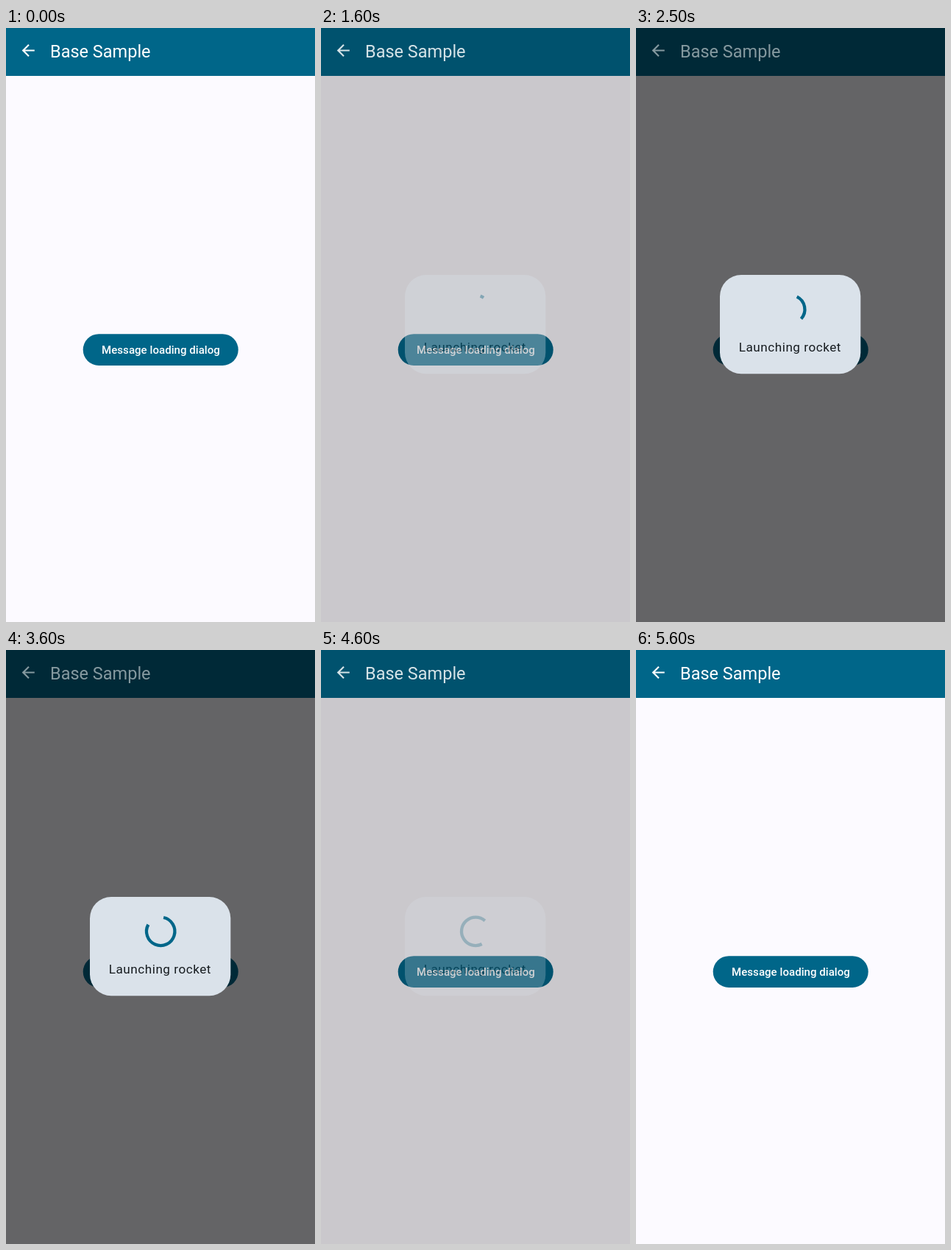
Write an HTML page that moves like this. It is 420 by 806 pixels and loops after 5700 ms.

```html
<!DOCTYPE html>
<html lang="en">
<head>
<meta charset="utf-8">
<title>Loading dialog</title>
<style>
  html, body { margin: 0; width: 100%; height: 100%; overflow: hidden; background: #fcfaff; }
  svg { display: block; width: 420px; height: 806px; }
  text { font-family: Roboto, sans-serif; }
</style>
</head>
<body>
<svg viewBox="0 0 420 806">
  <rect width="420" height="806" fill="#fcfaff"/>
  <rect width="420" height="65" fill="#006689"/>
  <rect x="104.7" y="415.2" width="211" height="42.8" rx="21.4" fill="#006689"/>
  <text x="130" y="442.4" font-size="15" font-weight="500" letter-spacing=".05" fill="#fff">Message loading dialog</text>
  <rect id="scrim" width="420" height="806" opacity="0"/>
  <g id="title" fill="#fff">
    <path transform="translate(17.4 17.7) scale(1.069)" d="M20 11H7.83l5.59-5.59L12 4l-8 8 8 8 1.41-1.41L7.83 13H20z"/>
    <text x="60" y="39.5" font-size="23.5">Base Sample</text>
  </g>
  <g id="dialog" opacity="0">
    <rect x="114" y="335" width="191.3" height="134.2" rx="29" fill="#dae2ea"/>
    <path id="arc" fill="none" stroke="#006689" stroke-width="4.3"/>
    <text x="139.8" y="439" font-size="17.1" letter-spacing=".53" fill="#171c20">Launching rocket</text>
  </g>
</svg>
<script>
const LOOP = 5700, STEP = 100, TURN = 1332;
const CENTER = { x: 210.2, y: 381.8 }, RADIUS = 19.2;
const [scrim, title, dialog, arc] =
  ['scrim', 'title', 'dialog', 'arc'].map(id => document.getElementById(id));

const scrimKeys = [[1500, 0], [1600, .2], [1700, .51], [1800, .6], [4400, .6], [4500, .55], [4600, .2], [4700, 0]];
const dialogKeys = [[1500, 0], [1600, .35], [1700, .99], [1800, 1], [4400, 1], [4500, .98], [4600, .25], [4700, 0]];
const spinKeys = [[1510, 0], [1700, 190], [2500, 940], [4500, 2945], [4700, 3145]];

const clamp = v => Math.min(1, Math.max(0, v));

function valueAt(keys, t) {
  const next = keys.findIndex(key => key[0] > t);
  if (next === 0) return keys[0][1];
  if (next < 0) return keys[keys.length - 1][1];
  const [t0, a] = keys[next - 1], [t1, b] = keys[next];
  return a + (b - a) * (t - t0) / (t1 - t0);
}

// cubic-bezier(.4, 0, .2, 1)
function ease(x) {
  x = clamp(x);
  let low = 0, high = 1;
  for (let i = 0; i < 24; i++) {
    const s = (low + high) / 2, r = 1 - s;
    if (1.2 * r * r * s + .6 * r * s * s + s ** 3 < x) low = s;
    else high = s;
  }
  return 3 * low * low - 2 * low ** 3;
}

function polar(degrees) {
  const a = degrees * Math.PI / 180;
  return `${CENTER.x + RADIUS * Math.cos(a)} ${CENTER.y + RADIUS * Math.sin(a)}`;
}

function spinnerPath(time) {
  const phase = time % TURN, half = TURN / 2;
  const base = -90 + 216 * Math.floor(time / TURN) + 286 * phase / TURN;
  const head = 290 * ease(phase / half);
  const tail = 290 * ease((phase - half) / half);
  const large = head - tail > 180 ? 1 : 0;
  return `M${polar(base + tail)}A${RADIUS} ${RADIUS} 0 ${large} 1 ${polar(base + head)}`;
}

function render(t) {
  const shade = valueAt(scrimKeys, t);
  scrim.setAttribute('opacity', shade);
  title.setAttribute('opacity', 1 - .8 * shade);
  dialog.setAttribute('opacity', valueAt(dialogKeys, t));
  arc.setAttribute('d', spinnerPath(valueAt(spinKeys, t)));
}

const start = performance.now();
function tick() {
  const t = (performance.now() - start) % LOOP;
  render(Math.floor(t / STEP) * STEP);
  requestAnimationFrame(tick);
}
tick();
</script>
</body>
</html>
```
